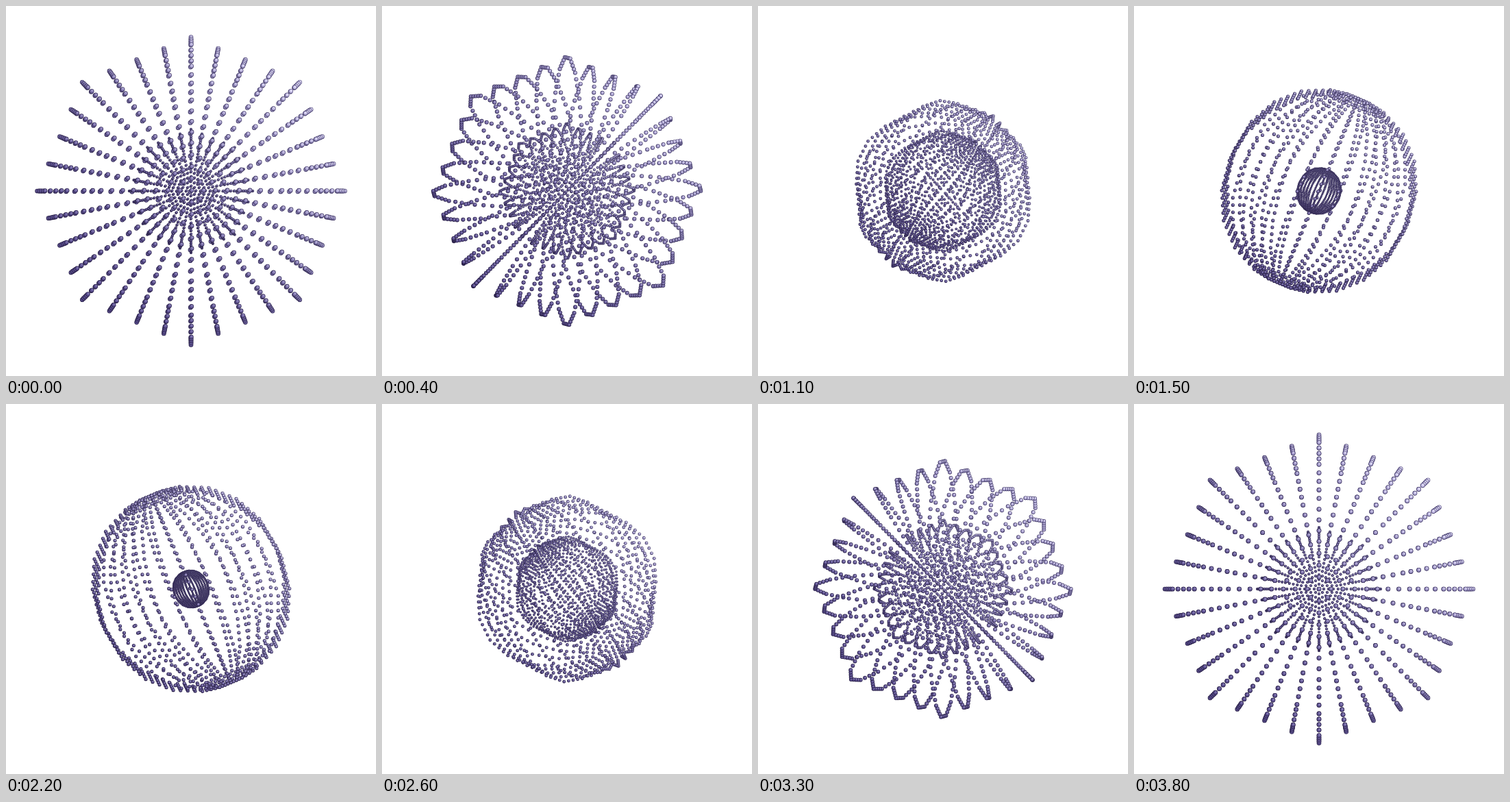
An HTML page with a canvas that plays this animation: 540x540 px, repeating every 3.9 s.

```html
<!DOCTYPE html>
<html lang="en">
<head>
<meta charset="utf-8">
<title>Twin dotted spheres</title>
<style>
  html, body { margin: 0; width: 100%; height: 100%; overflow: hidden; background: #fff; }
  canvas { display: block; width: 540px; height: 540px; }
</style>
</head>
<body>
<canvas width="540" height="540"></canvas>
<script>
const ctx = document.querySelector('canvas').getContext('2d');
const LOOP = 3900, STEP = 100;
const SIZE_LEAD = 65, TURN_LEAD = 100;
const CENTER = 270, SUB = 4, TAU = Math.PI * 2;

// Point on a polygon whose edges are split into `sub` equal parts.
function onPolygon(index, sides, sub, start) {
  const edge = Math.floor(index / sub), f = (index % sub) / sub;
  const a = start + edge * TAU / sides, b = a + TAU / sides;
  return [
    Math.cos(a) * (1 - f) + Math.cos(b) * f,
    Math.sin(a) * (1 - f) + Math.sin(b) * f
  ];
}

// Unit sphere: octagonal rings on a 20-sided meridian.
// The faces at the poles are triangles, so rings there hold fewer points.
function makeSphere() {
  const points = [], rows = 10 * SUB;
  for (let j = 0; j <= rows; j++) {
    const [r, z] = onPolygon(j, 20, SUB, -Math.PI / 2);
    const sub = Math.min(j, rows - j, SUB);
    if (!sub) points.push([0, 0, z]);
    for (let i = 0; i < 8 * sub; i++) {
      const [x, y] = onPolygon(i, 8, sub, 0);
      points.push([x * r, y * r, z]);
    }
  }
  return points;
}

const sphere = makeSphere();
const mix = (a, b, k) => a.map((v, i) => Math.round(v + (b[i] - v) * k));
const rgb = c => `rgb(${c})`;

// Shades from the dark lower left to the lit upper right.
const LEVELS = 24;
const shades = Array.from({ length: LEVELS + 1 }, (_, i) => {
  const k = i / LEVELS, lit = k ** 1.8;
  const base = mix([92, 80, 146], [206, 200, 238], lit);
  return {
    rim: rgb(mix([44, 35, 74], [84, 76, 122], lit)),
    base: rgb(base),
    glow: rgb(mix(base, [244, 242, 255], 0.25 + 0.45 * lit))
  };
});

function disc(x, y, r, color) {
  ctx.fillStyle = color;
  ctx.beginPath();
  ctx.arc(x, y, r, 0, TAU);
  ctx.fill();
}

function drawDot({ x, y, r }) {
  const k = Math.min(1, Math.max(0, 0.5 + (x - y) / 640));
  const shade = shades[Math.round(k * LEVELS)];
  const px = CENTER + x, py = CENTER + y;
  disc(px, py, r, shade.rim);
  disc(px + 0.15, py - 0.15, r - 0.8, shade.base);
  if (r > 2) disc(px + r * 0.22, py - r * 0.25, r * 0.36, shade.glow);
}

function project(radius, angle) {
  const c = Math.cos(angle), s = Math.sin(angle), r = 1 + radius * 0.0105;
  return sphere.map(([x, y, z]) => {
    const y1 = y * c - z * s, z1 = y * s + z * c;
    return {
      x: radius * (x * c + z1 * s),
      y: radius * y1,
      z: radius * (z1 * c - x * s),
      r
    };
  });
}

function draw(time) {
  const wave = Math.cos((time + SIZE_LEAD) / LOOP * TAU);
  const u = (time + TURN_LEAD) / LOOP;
  const turn = Math.PI * (1 - Math.cos(Math.PI * u)) / 2;
  const dots = [
    ...project(119.5 + 105.5 * wave, turn),
    ...project(122.3 - 32.2 * wave, turn)
  ];
  dots.sort((a, b) => a.z - b.z);
  ctx.fillStyle = '#fff';
  ctx.fillRect(0, 0, 540, 540);
  dots.forEach(drawDot);
}

let shown = -1;
const origin = performance.now();
function tick() {
  const time = (performance.now() - origin) % LOOP;
  const step = Math.floor(time / STEP);
  if (step !== shown) {
    shown = step;
    draw(step * STEP);
  }
  requestAnimationFrame(tick);
}
tick();
</script>
</body>
</html>
```
